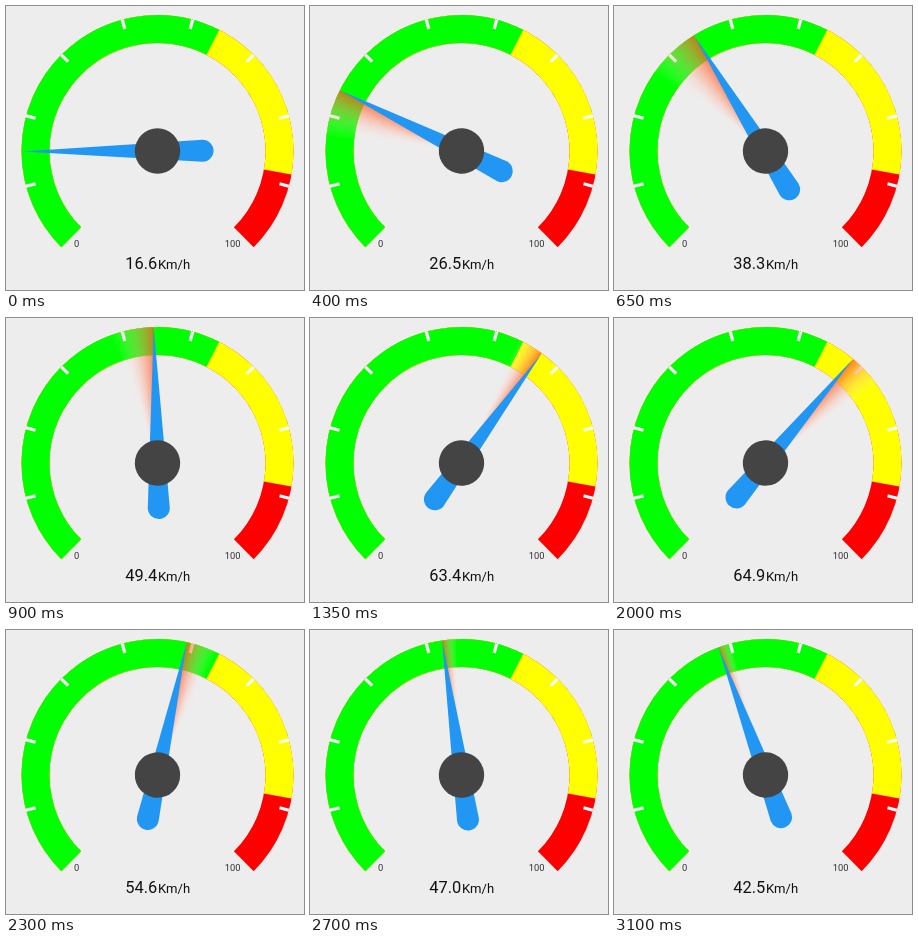
These frames come from a looping animation (298x284 px, 3150 ms). An HTML page with a canvas:

```html
<!DOCTYPE html>
<html lang="en">
<head>
<meta charset="utf-8">
<title>Speed gauge</title>
<style>
  html, body { margin: 0; width: 298px; height: 284px; overflow: hidden; background: #ededed; }
  canvas, svg { position: absolute; left: 0; top: 0; width: 298px; height: 284px; }
  text { font-family: Roboto, "Liberation Sans", sans-serif; fill: #111; }
  .limit { font-size: 9.4px; fill: #333; }
  #speed { font-size: 16.4px; text-anchor: end; }
  .unit { font-size: 13.1px; }
</style>
</head>
<body>
<canvas id="dial"></canvas>
<svg viewBox="0 0 298 284">
  <text class="limit" x="68" y="241">0</text>
  <text class="limit" x="218.8" y="241">100</text>
  <text id="speed" x="151.2" y="263">16.6</text>
  <text class="unit" x="152" y="263">Km/h</text>
</svg>
<script>
const LOOP = 3150, STEP = 50;
const HELD = [450, 1400, 2350];   // ticks that repeat the previous picture
// time in ms, speed, rate of change per second
const KEYS = [
  [0, 16.6, 0], [400, 26.5, 43], [900, 49.4, 38], [1350, 63.4, 24],
  [1750, 69.6, 0], [2300, 54.6, -28], [3100, 42.5, -12]
];
const CX = 151.5, CY = 145, R = 136, BAND = 28;
const START = 135, SWEEP = 270;
const rad = deg => deg * Math.PI / 180;

const canvas = document.getElementById('dial');
const label = document.getElementById('speed');
const ctx = canvas.getContext('2d');
const dpr = window.devicePixelRatio || 1;
canvas.width = 298 * dpr;
canvas.height = 284 * dpr;

// Cubic Hermite curve through KEYS: speed and its rate at time t
function sample(t) {
  let i = 0;
  while (i < KEYS.length - 2 && t >= KEYS[i + 1][0]) i++;
  const [t0, a, ra] = KEYS[i], [t1, b, rb] = KEYS[i + 1];
  const d = (t1 - t0) / 1000, u = (t - t0) / (t1 - t0);
  const m = ra * d, n = rb * d;
  const c3 = 2 * a - 2 * b + m + n, c2 = 3 * (b - a) - 2 * m - n;
  return {
    speed: ((c3 * u + c2) * u + m) * u + a,
    rate: ((3 * c3 * u + 2 * c2) * u + m) / d
  };
}

function band(color, share) {
  ctx.strokeStyle = color;
  ctx.lineWidth = BAND;
  ctx.beginPath();
  ctx.arc(0, 0, R - BAND / 2, rad(START), rad(START + SWEEP * share));
  ctx.stroke();
}

function drawScale() {
  band('#ff0000', 1);
  band('#ffff00', 0.87);
  band('#00ff00', 0.6);
  ctx.strokeStyle = '#fff';
  ctx.lineWidth = 3.2;
  for (let deg = 165; deg <= 375; deg += 30) {
    const x = Math.cos(rad(deg)), y = Math.sin(rad(deg));
    ctx.beginPath();
    ctx.moveTo(x * (R - 9.7), y * (R - 9.7));
    ctx.lineTo(x * R, y * R);
    ctx.stroke();
  }
}

// Glow behind the moving needle; the needle lies along +x
function drawLight(rate) {
  const sweep = Math.min(30, Math.abs(rate) * 0.48);
  if (sweep < 0.5) return;
  ctx.save();
  if (rate > 0) ctx.scale(1, -1);
  const glow = ctx.createConicGradient(0, 0, 0);
  glow.addColorStop(0, 'rgba(255,87,34,0.73)');
  glow.addColorStop(sweep / 360, 'rgba(255,255,255,0)');
  glow.addColorStop(1, 'rgba(255,255,255,0)');
  ctx.fillStyle = glow;
  ctx.beginPath();
  ctx.moveTo(0, 0);
  ctx.arc(0, 0, R, 0, rad(sweep));
  ctx.fill();
  ctx.restore();
}

function drawNeedle() {
  ctx.fillStyle = '#2196f3';
  ctx.beginPath();
  ctx.moveTo(R - 0.5, 0);
  ctx.lineTo(-45, 11);
  ctx.arc(-45, 0, 11, Math.PI / 2, Math.PI * 1.5);
  ctx.fill();
  ctx.fillStyle = '#444';
  ctx.beginPath();
  ctx.arc(0, 0, 22.7, 0, Math.PI * 2);
  ctx.fill();
}

function draw(now) {
  let t = Math.floor((now % LOOP) / STEP) * STEP;
  if (HELD.includes(t)) t -= STEP;
  const { speed, rate } = sample(t);
  ctx.setTransform(dpr, 0, 0, dpr, 0, 0);
  ctx.clearRect(0, 0, 298, 284);
  ctx.translate(CX, CY);
  drawScale();
  ctx.rotate(rad(START + SWEEP * speed / 100));
  drawLight(rate);
  drawNeedle();
  label.textContent = speed.toFixed(1);
}

const begin = performance.now();
function tick() {
  draw(performance.now() - begin);
  requestAnimationFrame(tick);
}
tick();
</script>
</body>
</html>
```
